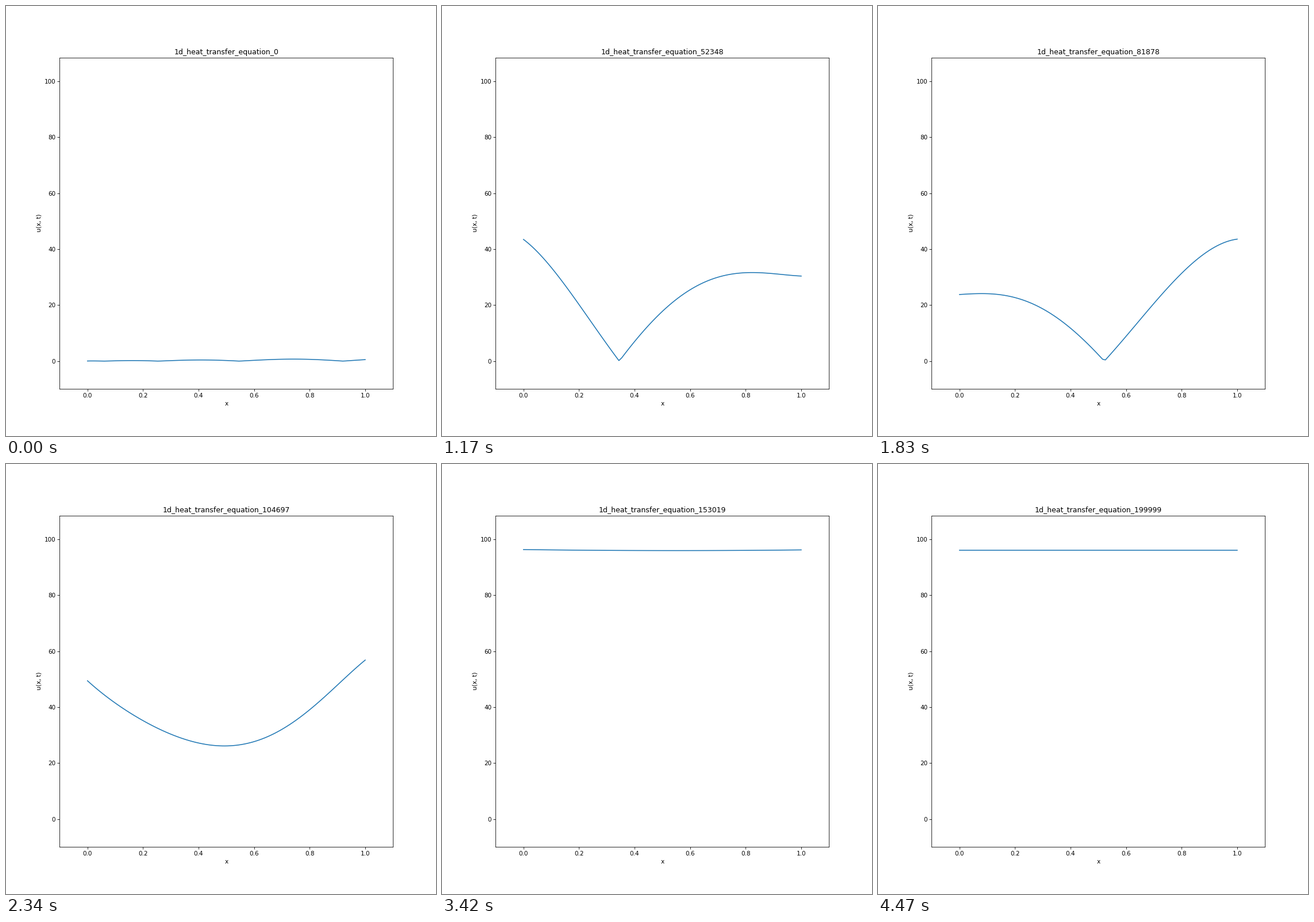
Write a matplotlib script that moves like this. It is 748x748 px and loops after 4500 ms.

```python
import numpy as np
import matplotlib.pyplot as plt
from matplotlib.animation import FuncAnimation

FRAMES = 150
INTERVAL = 30
LAST_STEP = 199999
PEAK = 98.62
REST = 96.1
SETTLE = 99

x = np.linspace(0, 1, 100)

# Signed u at six even points for the main poses; the plot shows |u|.
POSES = {
    20: (-14.3, -0.95, 7.75, 10.8, 12.35, 15.85),
    39: (-43.5, -20.2, 7, 25.5, 31.6, 30.4),
    61: (-23.8, -22.7, -11.75, 8.9, 31.4, 43.6),
    78: (49.45, 35.2, 27.2, 27.7, 39.1, 56.85),
    90: (90, 82, 76.4, 76.3, 82.8, 92.5),
}


def ripple():
    """Faint wave that widens and grows to the right."""
    return (0.05 + 0.9 * x) * np.sin(np.pi * (x ** 0.6 - 0.185) / 0.2555)


def through(points):
    knots = np.linspace(0, 1, len(points))
    return np.polyval(np.polyfit(knots, points, len(points) - 1), x)


def settled(frame):
    """Shallow bowl that flattens out at the resting level."""
    depth = 3 * np.exp((SETTLE - frame) / 6.5)
    return REST + depth * ((2 * x - 1.1) ** 2 - 0.4)


def monotone_slopes(t, v):
    """Tangents that keep the cubic between two keys from overshooting."""
    h = np.diff(t)[:, None]
    d = np.diff(v, axis=0) / h
    w0, w1 = h[:-1] + 2 * h[1:], 2 * h[:-1] + h[1:]
    same = d[:-1] * d[1:] > 0
    a, b = np.where(same, d[:-1], 1), np.where(same, d[1:], 1)
    slopes = np.zeros_like(v)
    slopes[1:-1] = np.where(same, (w0 + w1) / (w0 / a + w1 / b), 0)
    return slopes


def hermite(t, v, m, now):
    i = min(np.searchsorted(t, now, side="right") - 1, len(t) - 2)
    h = t[i + 1] - t[i]
    s = (now - t[i]) / h
    ease = s * s * (3 - 2 * s)
    return (v[i] * (1 - ease) + v[i + 1] * ease
            + h * s * (1 - s) * (m[i] * (1 - s) - m[i + 1] * s))


keys = {0: ripple()}
keys.update((t, through(points)) for t, points in POSES.items())
keys.update((t, settled(t)) for t in range(SETTLE, FRAMES, 5))
times = np.array(list(keys), dtype=float)
curves = np.array(list(keys.values()))
slopes = monotone_slopes(times, curves)
steps = np.linspace(0, LAST_STEP, FRAMES).astype(int)

fig, ax = plt.subplots(figsize=(10, 10), dpi=74.8)
fig.subplots_adjust(left=0.1249)
line, = ax.plot([], [])
ax.set_xlim(-0.1, 1.1)
ax.set_ylim(-0.1 * PEAK, 1.1 * PEAK)
ax.set_xlabel("x")
ax.set_ylabel("u(x, t)")
title = ax.set_title("")


def update(frame):
    line.set_data(x, np.abs(hermite(times, curves, slopes, frame)))
    title.set_text(f"1d_heat_transfer_equation_{steps[frame]}")
    return line, title


anim = FuncAnimation(fig, update, frames=FRAMES, interval=INTERVAL,
                     repeat=True, repeat_delay=0)
plt.show()
```
